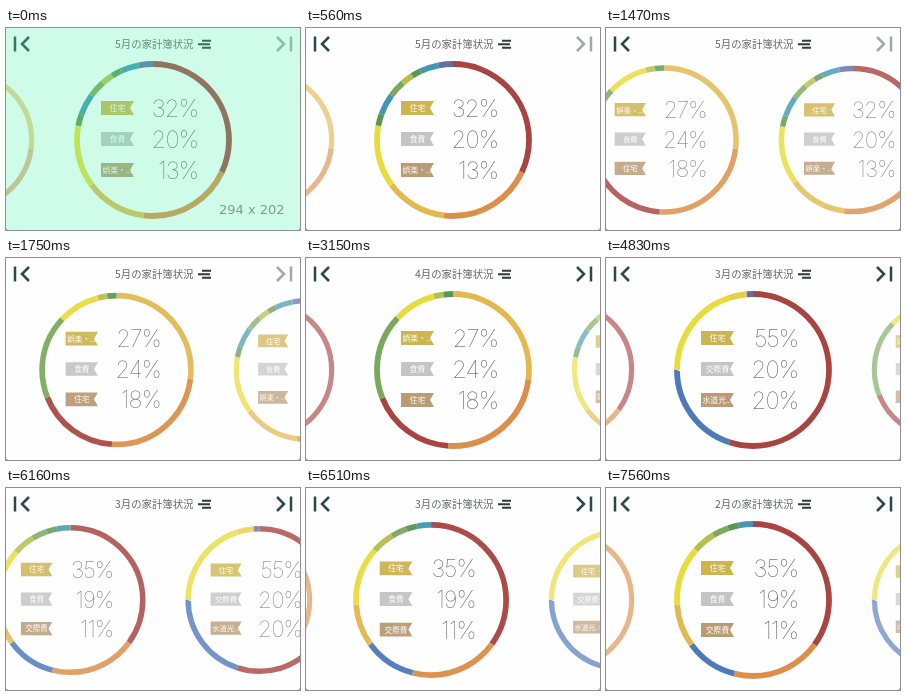
Recreate the animation shown at these times as an HTML page. Size 294 px wide and 202 px high, loop 8000 ms.

```html
<!DOCTYPE html>
<html lang="ja">
<head>
<meta charset="utf-8">
<style>
html, body { margin: 0; width: 100%; height: 100%; overflow: hidden; background: #fefefe; }
svg { display: block; width: 294px; height: 202px; }
text { font-family: "Noto Sans CJK JP", "Noto Sans CJK", sans-serif; }
.title { font-size: 10.4px; fill: #626565; }
.tag { font-size: 7.8px; fill: #fff; text-anchor: middle; }
.pct { font: 100 24px Inter, Roboto, sans-serif; letter-spacing: -1px; fill: #4a4a4a; text-anchor: end; }
.size { font: 13px "DejaVu Sans", sans-serif; fill: #7d9c8f; }
.arrow { fill: none; stroke: #2c4849; stroke-width: 2.5; }
</style>
</head>
<body>
<svg viewBox="0 0 294 202">
  <g id="pages"></g>
  <text class="title" x="109" y="20"><tspan id="month">5</tspan>月の家計簿状況</text>
  <path d="M196 12.7h9M192 16.2h12M196 19.7h9" stroke="#2f3a3a" stroke-width="2"/>
  <path class="arrow" d="M9 8.500v15M23 9l-7 7 7 7"/>
  <path class="arrow" id="next" d="M285 8.500v15M271 9l7 7-7 7"/>
  <path d="M0 199q0 3 3 3H0zM294 199q0 3-3 3h3z" fill="#999"/>
  <g id="cover">
    <rect width="294" height="202" fill="#50f5aa" fill-opacity=".27"/>
    <text class="size" x="213" y="186">294 x 202</text>
  </g>
</svg>
<script>
const LOOP = 8000, STEP = 70, GAP = 189;
const RED = '#a84543', ORANGE = '#db8f4b', GOLD = '#e2b94f', YELLOW = '#e8dc3c', BLUE = '#4f7ab8',
  GREEN = '#7aa95c', LIME = '#b4bf4e', FOREST = '#5c9656', TEAL = '#4397b2', INDIGO = '#656ca6';
const TAG_COLORS = ['#cdb452', '#c4c4c4', '#b99b76'];

// Newest month first; arcs are [colour, end in percent].
const months = [
  { rows: [['住宅', 32], ['食費', 20], ['娯楽・...', 13]],
    arcs: [[RED, 32], [ORANGE, 52], [GOLD, 65], [YELLOW, 78], [FOREST, 80.5], [TEAL, 85],
      [GREEN, 88.5], [LIME, 91], [FOREST, 93], [TEAL, 97], [INDIGO, 100]] },
  { rows: [['娯楽・...', 27], ['食費', 24], ['住宅', 18]],
    arcs: [[GOLD, 27], [ORANGE, 51], [RED, 69], [GREEN, 87], [YELLOW, 96], [LIME, 98], [FOREST, 100]] },
  { rows: [['住宅', 55], ['交際費', 20], ['水道光...', 20]],
    arcs: [[RED, 55], [BLUE, 75], [YELLOW, 95], ['#e6cf45', 98.7], [INDIGO, 100]] },
  { rows: [['住宅', 35], ['食費', 19], ['交際費', 11]],
    arcs: [[RED, 35], [ORANGE, 54], [BLUE, 65], [GOLD, 74], [YELLOW, 86.5], [LIME, 91.3],
      [GREEN, 94.7], [FOREST, 97], [TEAL, 100]] },
  { rows: [], arcs: [[ORANGE, 100]] }
];

// Each swipe: start time and [elapsed, progress] points.
const quick = [[0, 0], [350, .563], [560, .768], [840, 1]];
const swipes = [
  { start: 1190, keys: [[0, 0], [280, .529], [560, .807], [840, .98], [980, 1]] },
  { start: 3500, keys: quick },
  { start: 5810, keys: quick }
];

const $ = id => document.getElementById(id);
const clamp = v => Math.max(0, Math.min(1, v));

function arc([color, end], i, arcs) {
  const from = i ? arcs[i - 1][1] : 0;
  return `<circle r="76" fill="none" stroke="${color}" stroke-width="5.8" pathLength="100"
    stroke-dasharray="${end - from} 100" stroke-dashoffset="${-from}" transform="rotate(-90)"/>`;
}

function row([name, percent], i) {
  return `<g transform="translate(0 ${i * 31 - 32})">
    <path d="M-52-7h33l-4 7 4 7h-33z" fill="${TAG_COLORS[i]}"/>
    <text class="tag" x="-35.5" y="3">${name}</text>
    <text class="pct" x="45" y="9">${percent}%</text></g>`;
}

$('pages').innerHTML = months.map(m =>
  `<g>${m.arcs.map(arc).join('')}${m.rows.map(row).join('')}</g>`).join('');
const pages = [...$('pages').children];

function progress(keys, t) {
  let p = 0;
  for (let i = 1; i < keys.length; i++) {
    const [t0, p0] = keys[i - 1], [t1, p1] = keys[i];
    p += (p1 - p0) * clamp((t - t0) / (t1 - t0));
  }
  return p;
}

function draw(t) {
  const scroll = swipes.reduce((sum, s) => sum + progress(s.keys, t - s.start), 0);
  pages.forEach((page, i) => {
    const d = scroll - i, far = Math.min(1, Math.abs(d));
    page.setAttribute('transform', `translate(${147 + d * GAP} 112) scale(${1 - .11 * far})`);
    page.setAttribute('opacity', 1 - .36 * far);
  });
  $('month').textContent = 5 - [2590, 4690, 7140].filter(at => t >= at).length;
  $('next').setAttribute('opacity', .46 + .54 * clamp((t - 2520) / 210));
  $('cover').setAttribute('opacity', clamp(1 - t / 280));
}

const origin = performance.now();
function frame() {
  const t = (performance.now() - origin) % LOOP;
  draw(Math.floor(t / STEP) * STEP);
  requestAnimationFrame(frame);
}
frame();
</script>
</body>
</html>
```
